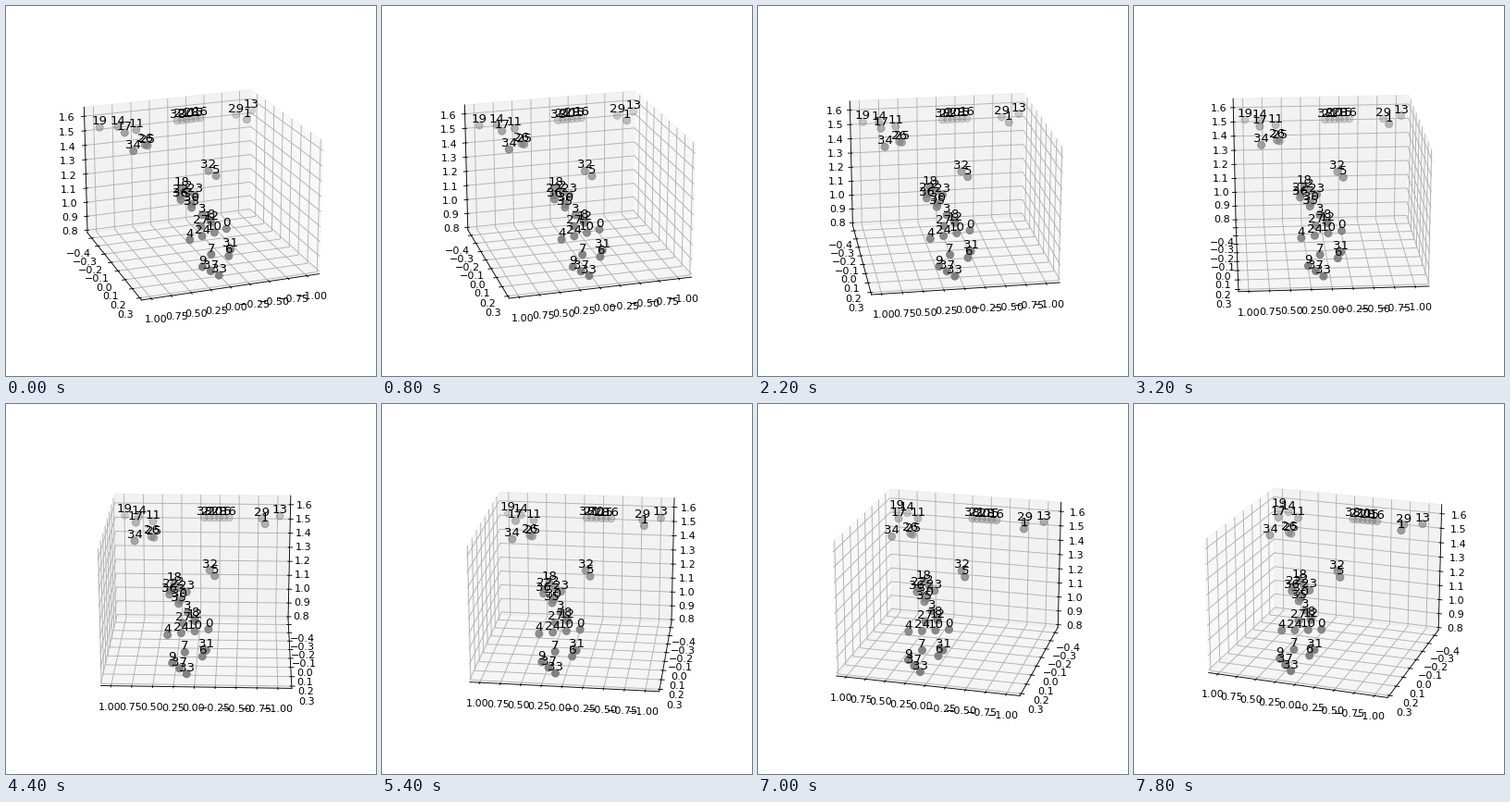
These frames come from a looping animation (400x400 px, 8 s). A matplotlib script:

```python
import numpy as np
import matplotlib.pyplot as plt
from matplotlib.animation import FuncAnimation

ELEV, START, FRAMES = 20, 70, 40
CENTER = np.array([-.022, -.0735, 1.222])
SCALE = np.array([1.922, .665, .986])
HALF = np.array([.5953, .5953, .4465])  # half sizes of the box

# Runs of labels spread evenly along a path of (x, y) key points
RUNS = {
    "38 21 20 28 15 16": [(-.016, -.482), (-.182, -.485)],
    "19 14 11": [(.52, -.5), (.32, -.33)],
    "17 34": [(.427, -.24), (.423, -.07)],
    "26 25": [(.319, -.148), (.303, -.148)],
    "13 29 1": [(-.52, -.4), (-.4, -.38), (-.422, -.24)],
    "32 5": [(-.066, -.008), (-.1, .039)],
    "18 2 23": [(.157, .101), (.078, .128)],
    "22 30": [(.183, .142), (.119, .181)],
    "36 35 3": [(.186, .163), (.066, .234)],
    "27 12 8": [(.095, .288), (.019, .273), (.022, .262)],
    "4 24 10 0": [(.19, .345), (-.068, .315)],
    "31 6 7": [(-.057, .418), (-.034, .447), (.077, .428)],
    "9 37 33": [(.154, .479), (.062, .527)],
}


def height(x, y):
    """Curved sheet that falls with y and folds up on both sides."""
    fold = np.maximum(0, 1 - ((y + .08) / .4) ** 2)
    return .085 - .684 * y - .405 * y ** 2 + .37 * np.abs(x) * fold


def spread(keys, n):
    t = np.linspace(0, 1, n)
    knots = np.linspace(0, 1, len(keys))
    x, y = (np.interp(t, knots, axis) for axis in zip(*keys))
    return np.column_stack([x, y, height(x, y)])


names = " ".join(RUNS).split()
unit = np.vstack([spread(keys, len(run.split())) for run, keys in RUNS.items()])
points = CENTER + SCALE * unit

fig = plt.figure(figsize=(5, 5), dpi=80)
ax = fig.add_subplot(projection="3d")
ax.scatter(*points.T, s=50, c="gray")
for name, p in zip(names, points):
    ax.text(*p, name, size=12, ha="center", va="bottom", color="black")

low, high = CENTER - SCALE * HALF, CENTER + SCALE * HALF
ax.set(xlim=(low[0], high[0]), ylim=(low[1], high[1]), zlim=(low[2], high[2]))


def update(i):
    ax.view_init(ELEV, START + i)
    return []


anim = FuncAnimation(fig, update, frames=FRAMES, interval=200,
                     init_func=lambda: update(0), repeat=True, repeat_delay=0)
plt.show()
```
